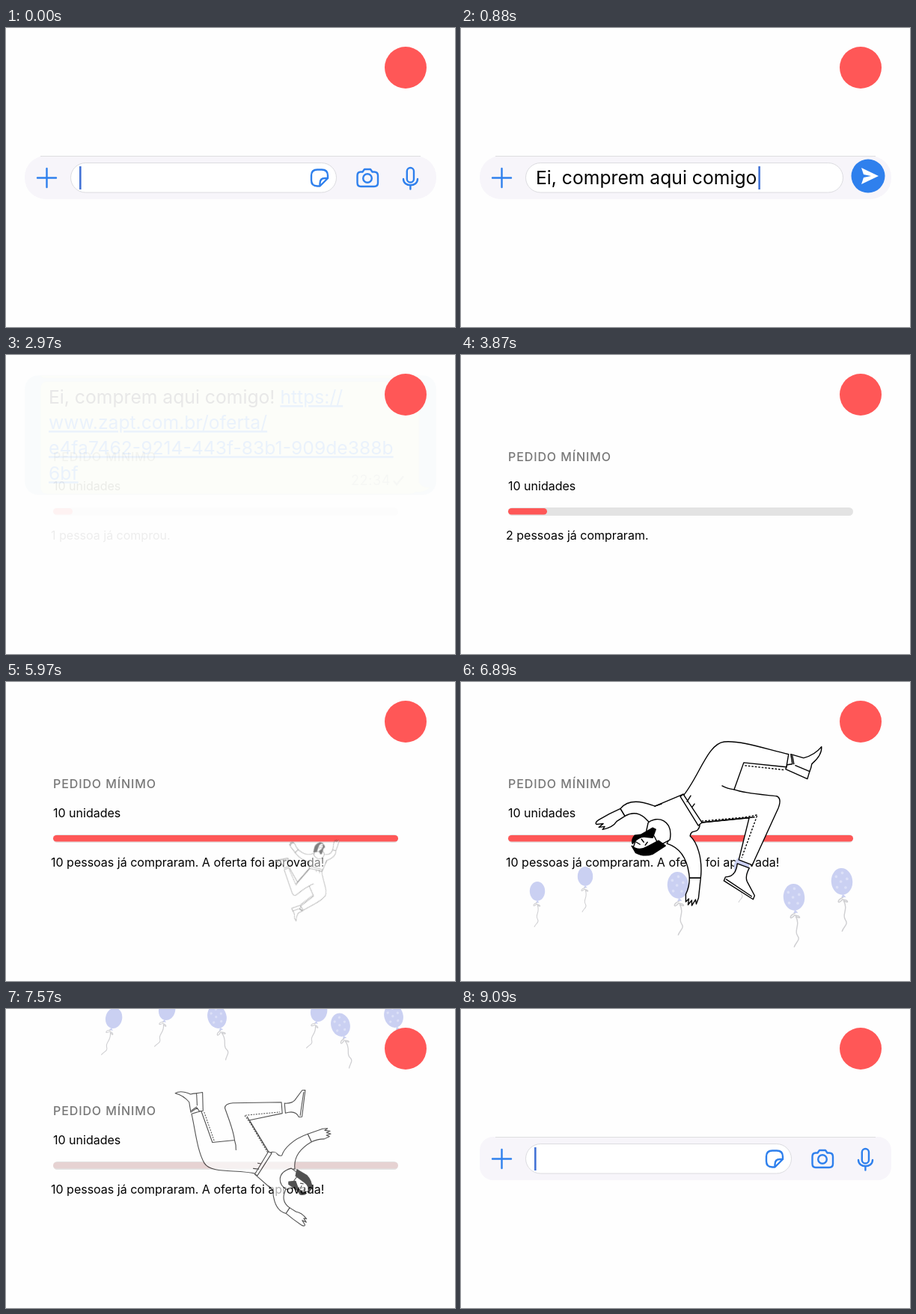
An HTML page that plays this animation: 600 by 400 pixels, repeating every 9.19 s.

```html
<!DOCTYPE html>
<html lang="pt-BR">
<head>
<meta charset="utf-8">
<style>
  html, body { margin: 0; width: 100%; height: 100%; overflow: hidden; background: #fefefe; }
  svg { display: block; width: 100vw; height: 100vh; font: 16px Inter, "Open Sans", sans-serif; }
  .chat { font-size: 24.7px; }
  .icon { fill: none; stroke: #2f80ed; stroke-width: 2.4; stroke-linecap: round; stroke-linejoin: round; }
  .field { fill: #fff; stroke: #dcdce0; }
  .link { fill: #2078e8; text-decoration: underline; }
  .body { fill: #fff; stroke: #000; stroke-width: 1.4; stroke-linejoin: round; stroke-linecap: round; }
  .line { fill: none; }
  .dots { fill: none; stroke-dasharray: 1.5 3; }
  .ink { fill: #000; }
</style>
</head>
<body>
<svg viewBox="0 0 600 400">
  <defs>
    <g id="plus"><path class="icon" d="M-12.5 0H12.5M0-12.5V12.5" stroke-width="3"/></g>
    <g id="plane">
      <circle r="22.5" fill="#2f80ed"/>
      <path d="M-9-11L14 0L-9 11L-6 2L4 0L-6-2Z" fill="#fff"/>
    </g>
    <g id="balloon">
      <ellipse rx="10" ry="12.6" fill="#cad0f2"/>
      <path d="M-2 15L0 12L2.500 15Z" fill="#cad0f2"/>
      <path d="M0 15C-7 17-6 22-1 17C5 18 5 22 0 18C4 27-3 31 0 36S-2 42-4 47" fill="none" stroke="#cfcfd2"/>
    </g>
    <g id="spots" fill="#dce0f7">
      <circle cx="-5" cy="-5" r="1.300"/><circle cx="1" cy="-8" r="1.300"/><circle cx="5" cy="-2" r="1.300"/>
      <circle cx="-1" cy="0" r="1.300"/><circle cx="-5" cy="5" r="1.300"/><circle cx="3" cy="6" r="1.300"/>
    </g>
  </defs>

  <g id="input">
    <rect id="bar" x="25" y="171" width="550" height="58" fill="#f7f5fa"/>
    <path d="M46 171.500H554" stroke="#dedee0"/>
    <use href="#plus" x="54.500" y="200.500"/>
    <rect id="field" class="field" x="86.500" y="180.500" width="355" height="39.500" rx="19.750"/>
    <g id="icons" class="icon">
      <path d="M419 211.500H416Q408 211.500 408 203.500V197.500Q408 189.500 416 189.500H422Q430 189.500 430 197.500V201L419.500 211.500V208Q419.500 201 426 201H430"/>
      <path d="M474 192.500H476.500L479 189H487L489.500 192.500H492Q497 192.500 497 197.500V207Q497 212 492 212H474Q469.500 212 469.500 207V197.500Q469.500 192.500 474 192.500Z"/>
      <circle cx="483" cy="201" r="5.800"/>
      <rect x="535.800" y="187" width="9.200" height="19.500" rx="4.600"/>
      <path d="M531 202C531 213 550 213 550 202M540.400 210.500V215.500"/>
    </g>
    <text id="typed" class="chat" x="100" y="209"></text>
    <rect id="caret" y="185" width="2.600" height="31" fill="#4474d6"/>
    <use id="send" href="#plane" x="544" y="198"/>
  </g>

  <g id="draft">
    <rect x="25" y="127" width="550" height="153" rx="18" fill="#f7f5fa"/>
    <use href="#plus" x="54.500" y="242"/>
    <rect class="field" x="86.500" y="134.500" width="424" height="137" rx="19"/>
    <g class="chat">
      <text x="100" y="162">Ei, comprem aqui comigo!</text>
      <text x="100" y="195">https://www.zapt.com.br/oferta/</text>
      <text x="100" y="228">e4fa7462-9214-443f-83b1-</text>
      <text x="100" y="261">909de388b6bf</text>
    </g>
    <use href="#plane" x="544" y="242"/>
  </g>

  <g id="card">
    <rect x="25" y="129" width="550" height="160" rx="18" fill="#cae4ee"/>
    <g fill="#ebf8c6" stroke="#c4dfd8">
      <path d="M46 129H552Q551 133 544 133H54Q47 133 46 129Z"/>
      <path d="M56 137H542Q552 137 552 147V272Q555 279 567 279Q558 287 547 285Q545 288 540 288H56Q46 288 46 278V147Q46 137 56 137Z"/>
    </g>
    <g class="chat">
      <text x="57" y="167">Ei, comprem aqui comigo! <tspan class="link">https://</tspan></text>
      <text class="link" x="57" y="201">www.zapt.com.br/oferta/</text>
      <text class="link" x="57" y="235">e4fa7462-9214-443f-83b1-909de388b</text>
      <text class="link" x="57" y="269">6bf</text>
    </g>
    <text x="461" y="276" font-size="18" letter-spacing=".6" fill="#a5b29b">22:34</text>
    <path d="M518 270L522 275L531 264" fill="none" stroke="#a5b29b" stroke-width="2.200"/>
  </g>
  <circle id="ring" cx="544" cy="242" fill="none" stroke="#ff5757" stroke-width="6"/>

  <g id="goal">
    <text x="63" y="142" font-weight="500" letter-spacing=".9" fill="#777">PEDIDO MÍNIMO</text>
    <text x="63" y="181">10 unidades</text>
    <g id="progress">
      <rect x="63" y="204" width="461" height="11" rx="5.500" fill="#e3e3e3"/>
      <rect id="fill" x="63" y="205" height="8.500" rx="4.250" fill="#ff5757"/>
    </g>
    <text id="count" x="60" y="247"></text>
  </g>

  <g id="balloons"></g>

  <g id="dancer" class="body">
    <path d="M441 97L458 102Q473 98 482 87Q483 98 469 110Q468 116 466 120L463 130L434 117L436 111L443 110Z"/>
    <path d="M447 112L466 120M443 99L445 110" class="line"/>
    <path d="M369 243L385 249Q379 260 382 267L392 286L390 291L351 266L353 261Q367 261 369 243Z"/>
    <path d="M354 264L388 287" class="line"/>
    <path d="M297 152C318 127 330 82 352 80C376 78 411 91 438 97L435 114L378 108L365 144C382 150 407 151 422 153Q429 156 424 169L389 245L371 238L385 182L321 188Z"/>
    <path d="M349 139Q356 143 365 144M321 188L392 181" class="line"/>
    <path d="M380 112L433 118M322 186L380 181L396 178L375 235" class="dots"/>
    <path d="M213 169Q199 175 184 184Q178 188 181 190L190 189L184 194L192 193L189 197Q203 194 208 186L219 179Z"/>
    <path d="M305 262Q305 274 300 284L300 294L304 290L303 298L308 292L308 299L313 291L314 297L317 289L320 262Z"/>
    <path d="M297 150L259 166C237 157 222 158 213 169L219 179Q233 171 245 181L256 192C277 203 279 211 275 216C294 222 303 238 305 262L320 262C323 235 315 214 306 206C308 195 316 205 319 192Z"/>
    <path d="M293 153L297 150L322 188L317 192ZM302 160L307 152M309 167L312 163M259 166L268 163" />
    <path d="M250 188C262 178 284 184 279 211L264 219L246 206Z"/>
    <path d="M235 207Q247 201 258 206L264 218L253 228Q239 230 230 221Z"/>
    <path class="ink" d="M232 205L240 204L256 195L260 197L256 208L246 207Q238 206 229 216Q227 211 232 205Z"/>
    <path class="ink" d="M228 219Q237 227 249 220L264 212L273 219L256 230Q244 234 233 228Z"/>
    <path class="line" d="M234 214L239 217M241 210L244 214M246 218L249 214"/>
  </g>

  <circle cx="534" cy="53" r="28" fill="#ff5757"/>
</svg>
<script>
const LOOP = 9190;
const MESSAGE = "Ei, comprem aqui comigo!";
const FILL_ENDS = [89, 115, 165, 225, 284, 333, 370, 412, 468, 524];
// start x, y, then end x, y, then whether it is a large spotted one
const BALLOONS = [
  [102, 280, 144, 13, 0], [166, 260, 215, 2, 0], [290, 272, 282, 11, 1],
  [375, 247, 418, 4, 0], [445, 288, 447, 22, 1], [509, 267, 518, 10, 1]
];
const $ = id => document.getElementById(id);
const set = (id, name, value) => $(id).setAttribute(name, value);
const show = (id, alpha) => set(id, "opacity", alpha);
const mix = (a, b, p) => a + (b - a) * p;

// Piecewise linear track: time, value, time, value, ...
function track(t, ...keys) {
  if (t <= keys[0]) return keys[1];
  for (let i = 2; i < keys.length; i += 2)
    if (t < keys[i]) return mix(keys[i - 1], keys[i + 1], (t - keys[i - 2]) / (keys[i] - keys[i - 2]));
  return keys[keys.length - 1];
}

$("balloons").innerHTML = BALLOONS.map(b =>
  `<g><use href="#balloon"/>${b[4] ? '<use href="#spots"/>' : ""}</g>`).join("");

function drawInput(t) {
  const typing = t >= 120 && t < 1320;
  const letters = !typing ? 0 : t >= 1120 ? 24 : Math.min(23, 3 * (1 + Math.floor((t - 120) / 108)));
  show("input", t < 1320 ? 1 : track(t, 8600, 0, 9050, 1));
  set("bar", "rx", t < 1320 ? 28 : 18);
  set("field", "width", typing ? 424 : 355);
  show("icons", typing ? 0 : 1);
  show("send", typing ? 1 : 0);
  $("typed").textContent = MESSAGE.slice(0, letters);
  set("caret", "x", 98 + (letters ? $("typed").getComputedTextLength() + 4 : 0));
}

function drawMessage(t) {
  show("draft", t < 1320 ? 0 : track(t, 1620, 1, 1920, 0));
  set("draft", "transform", `translate(0 ${track(t, 1620, 0, 1920, -56)})`);
  show("card", track(t, 1840, 0, 2340, 1, 2650, 1, 3000, 0));
  set("card", "transform", `translate(0 ${track(t, 2650, 0, 3000, -111)})`);
  show("ring", track(t, 1600, 0, 1640, .85, 1990, .34, 2210, 0));
  set("ring", "r", track(t, 1600, 14, 1800, 24.5));
}

function drawGoal(t) {
  const n = t < 3870 ? 1 : Math.min(10, 2 + Math.floor((t - 3870) / 180));
  show("goal", track(t, 2950, 0, 3270, 1, 7950, 1, 8190, 0));
  show("progress", track(t, 7570, 1, 7810, 0));
  show("fill", track(t, 7290, 1, 7570, .12, 7620, 0));
  set("fill", "width", FILL_ENDS[n - 1] - 63);
  $("count").textContent = n < 2 ? "1 pessoa já comprou."
    : n + " pessoas já compraram." + (n > 9 ? " A oferta foi aprovada!" : "");
}

function drawParty(t) {
  const rise = ((t - 6450) / 1120) ** 3;
  const p = (rise - .0606) / .9394;
  show("balloons", t > 7900 ? 0 : track(t, 6450, 0, 6700, 1));
  BALLOONS.forEach(([x0, y0, x1, y1, big], i) => {
    const tilt = big ? mix(-5, -16, p) : mix(0, 14, p);
    const size = big ? mix(1.42, 1.26, p) : mix(1.02, 1.1, p);
    $("balloons").children[i].setAttribute("transform",
      `translate(${mix(x0, x1, p)} ${mix(y0, y1, p)}) rotate(${tilt}) scale(${size})`);
  });

  const x = track(t, 5510, 425, 5970, 411.7, 6890, 315, 7570, 341.8, 7810, 350);
  const y = track(t, 5510, 270, 5970, 252, 6890, 172, 7570, 201, 7810, 212);
  const turn = track(t, 5510, 205, 5970, 136.5, 6890, 0, 7570, -115.5, 7810, -156);
  const size = track(t, 5510, .08, 5970, .383, 6890, 1, 7570, .777, 7810, .7);
  show("dancer", track(t, 5480, 0, 5970, .5, 6330, 1, 7290, 1, 7570, .68, 7810, 0));
  set("dancer", "transform", `translate(${x} ${y}) rotate(${turn}) scale(${size}) translate(-315 -172)`);
}

function frame() {
  const t = performance.now() % LOOP;
  drawInput(t);
  drawMessage(t);
  drawGoal(t);
  drawParty(t);
  requestAnimationFrame(frame);
}
frame();
</script>
</body>
</html>
```
